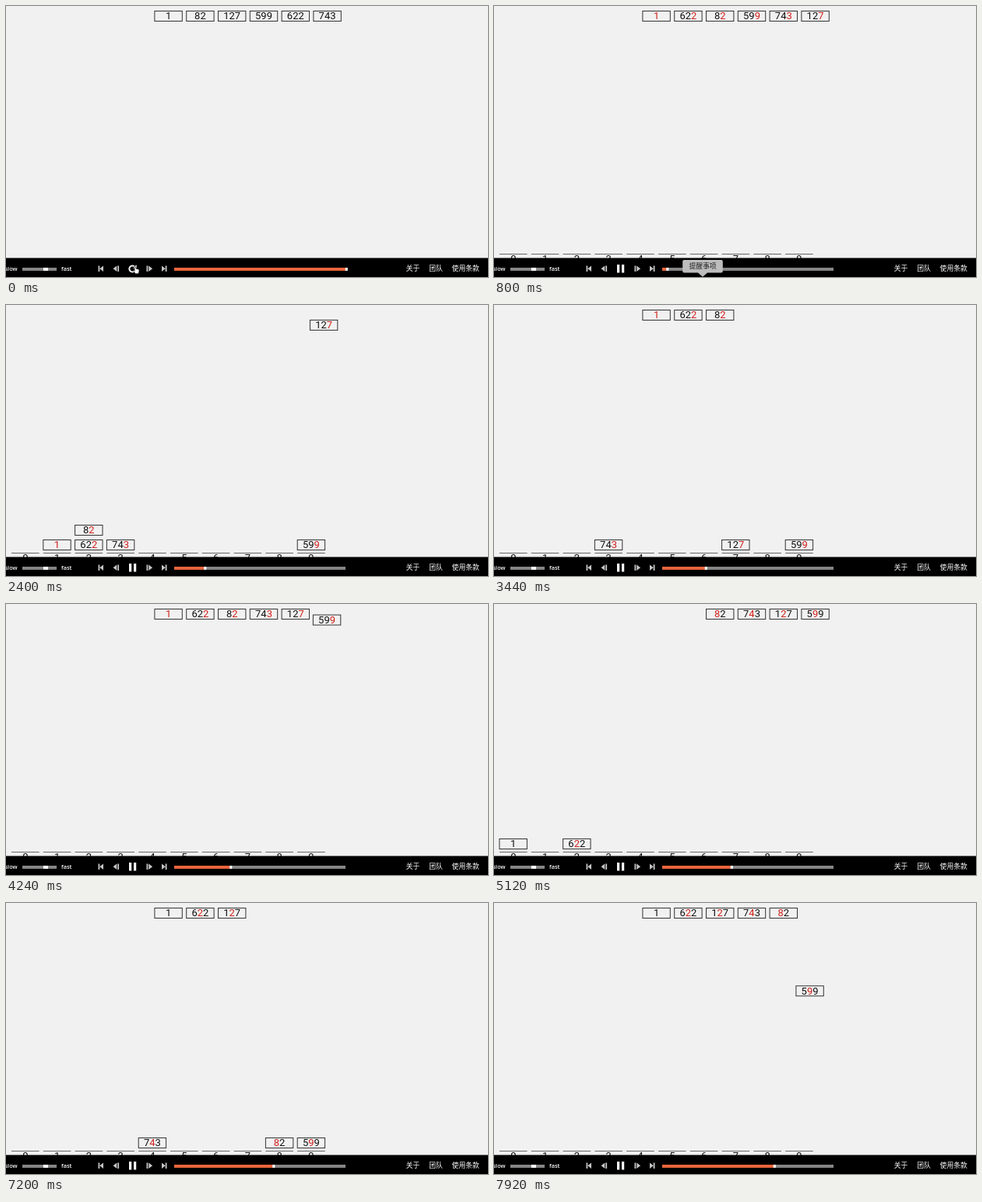
Recreate the animation shown at these times as an HTML page. Size 619 by 349 pixels, loop 8000 ms.

```html
<!DOCTYPE html>
<html lang="zh">
<head>
<meta charset="utf-8">
<style>
html, body { margin: 0; width: 100%; height: 100%; overflow: hidden; background: #f1f1f1; }
svg { display: block; width: 619px; height: 349px; }
.num { font: 13px Roboto, sans-serif; text-anchor: middle; fill: #111; }
.num .hot { fill: #d0201a; }
.item rect { fill: #f1f1f1; stroke: #333; }
.ui { font: 500 8.8px "Noto Sans CJK SC", "Noto Sans CJK", sans-serif; fill: #fff; }
.speed { font: 600 7.4px "Open Sans", sans-serif; fill: #fff; }
</style>
</head>
<body>
<svg viewBox="0 0 619 349">
  <rect width="619" height="349" fill="#f1f1f1"/>
  <g id="buckets"></g>
  <g id="items"></g>

  <rect y="324.5" width="619" height="25" fill="#000"/>
  <text class="speed" x="-1.5" y="341">slow</text>
  <rect x="21" y="337" width="44" height="4" fill="#858585"/>
  <rect x="48" y="337" width="6" height="4" fill="#fff"/>
  <text class="speed" x="71" y="341">fast</text>

  <g fill="#c4c4c4">
    <path d="M118.5 334.5h1.8v7.5h-1.8zM125 334.5v7.5l-4.7-3.75z"/>
    <path d="M142.3 334.5v7.5l-4.8-3.75zM143.3 334.5h1.8v7.5h-1.8z"/>
    <path d="M180.5 334.5h1.8v7.5h-1.8zM183.3 334.5v7.5l4.8-3.75z"/>
    <path d="M200 334.5v7.5l4.7-3.75zM204.7 334.5h1.8v7.5h-1.8z"/>
  </g>
  <path id="pause" fill="#fff" d="M158 333h3.2v10.5h-3.2zM164 333h3.2v10.5h-3.2z"/>
  <g id="replay">
    <path d="M165.2 335.6a4 4 0 1 0 1.1 3.4" fill="none" stroke="#eee" stroke-width="2"/>
    <path d="M167.6 333.2v4.6h-4.6z" fill="#eee"/>
  </g>

  <rect x="216" y="337" width="220" height="4" fill="#858585"/>
  <rect id="fill" x="216" y="337" height="4" fill="#e8643c"/>
  <rect id="knob" y="337" width="3" height="4" fill="#fff"/>

  <text class="ui" x="513.8" y="341.3">关于</text>
  <text class="ui" x="543.2" y="341.3">团队</text>
  <text class="ui" x="572.6" y="341.3">使用条款</text>

  <g id="tip">
    <path d="M244.2 327h47.6a2 2 0 0 1 2 2v12.4a2 2 0 0 1-2 2h-17.8l-6 5.4-6-5.4h-17.8a2 2 0 0 1-2-2v-12.4a2 2 0 0 1 2-2z" fill="#bdbdbd"/>
    <text class="ui" x="250.4" y="338.4" style="fill:#222">提醒事项</text>
  </g>
  <path id="hand" d="M1.2 .6q1.2-.6 1.6.6l.7 2 3 .8q1 .4 1 1.4l-.3 2.4-1 1.9h-3.4l-2.4-3q-.5-1 .6-1l.9.5z" fill="#fff" stroke="#111" stroke-width=".6"/>
</svg>
<script>
const LOOP = 8000, MOVE = 230, GAP = 40.8;
const start = [1, 622, 82, 599, 743, 127];
const $ = id => document.getElementById(id);

function add(parent, tag, attrs = {}, text = '') {
  const el = document.createElementNS('http://www.w3.org/2000/svg', tag);
  for (const k in attrs) el.setAttribute(k, attrs[k]);
  el.textContent = text;
  parent.appendChild(el);
  return el;
}

const slot = i => [190.9 + GAP * i, 6.5];
const stack = (b, j) => [7 + GAP * b, 302.5 - 19 * j];
const digit = (n, place) => Math.floor(n / 10 ** place) % 10;

// Radix sort, one state per move; place -1 means no highlighted digit
const states = [];
function save(row, buckets, place) {
  const pos = {};
  row.forEach((n, i) => { if (n !== null) pos[n] = slot(i); });
  buckets.forEach((list, b) => list.forEach((n, j) => pos[n] = stack(b, j)));
  states.push({ pos, place });
}
save([...start].sort((a, b) => a - b), [], -1);
save(start, [], -1);
let row = [...start];
for (let place = 0; place < 3; place++) {
  const buckets = Array.from({ length: 10 }, () => []);
  save(row, buckets, place);
  row.forEach((n, i) => {
    buckets[digit(n, place)].push(n);
    row[i] = null;
    save(row, buckets, place);
  });
  row = [];
  for (const list of buckets) while (list.length) {
    row.push(list.shift());
    save(row, buckets, place);
  }
}

// Step start times, linear between [step, ms] anchors
const anchors = [[0, 60], [1, 664], [6, 2084], [7, 2350], [8, 2642], [17, 5183], [18, 5522], [22, 6648], [26, 7792], [27, 8078]];
const starts = [];
anchors.slice(1).forEach(([k1, t1], i) => {
  const [k0, t0] = anchors[i];
  for (let k = k0; k < k1; k++) starts[k] = t0 + (t1 - t0) * (k - k0) / (k1 - k0);
});

for (let i = 0; i < 10; i++) {
  const x = 7 + GAP * i;
  add($('buckets'), 'path', { d: `M${x} 319.5h35.6`, stroke: '#666' });
  add($('buckets'), 'text', { class: 'num', x: x + 17.8, y: 330 }, i);
}

const items = start.map(n => {
  const g = add($('items'), 'g', { class: 'item' });
  add(g, 'rect', { width: 35.4, height: 13 });
  const text = add(g, 'text', { class: 'num', x: 17.7, y: 10.8 });
  const spans = [...String(n)].map(c => add(text, 'tspan', {}, c)).reverse();
  return { n, g, spans };
});

const clamp = u => Math.min(1, Math.max(0, u));
const ease = u => u < .5 ? 4 * u ** 3 : 1 - 4 * (1 - u) ** 3;
const show = (id, on) => $(id).style.display = on ? '' : 'none';

function draw(t) {
  let step = -1;
  while (step + 1 < starts.length && starts[step + 1] <= t) step++;
  const now = states[step + 1], prev = states[Math.max(step, 0)];
  const p = step < 0 ? 1 : ease(clamp((t - starts[step]) / MOVE));

  for (const { n, g, spans } of items) {
    const [x0, y0] = prev.pos[n], [x1, y1] = now.pos[n];
    g.setAttribute('transform', `translate(${x0 + (x1 - x0) * p} ${y0 + (y1 - y0) * p})`);
    spans.forEach((s, i) => s.setAttribute('class', i === now.place ? 'hot' : ''));
  }

  const done = 5.5 * (step < 0 ? 40 : step);
  $('fill').setAttribute('width', done);
  $('knob').setAttribute('x', 215.8 + done);

  show('buckets', step >= 0);
  show('pause', step >= 0);
  show('replay', step < 0);
  show('tip', t >= 700 && t < 1400);

  const m = clamp((t - 420) / 280);
  $('hand').setAttribute('transform', `translate(${163.5 + 100 * m} ${335 + 16 * m})`);
  show('hand', m < 1);
}

const t0 = performance.now();
function tick() {
  draw((performance.now() - t0) % LOOP);
  requestAnimationFrame(tick);
}
draw(0);
requestAnimationFrame(tick);
</script>
</body>
</html>
```
